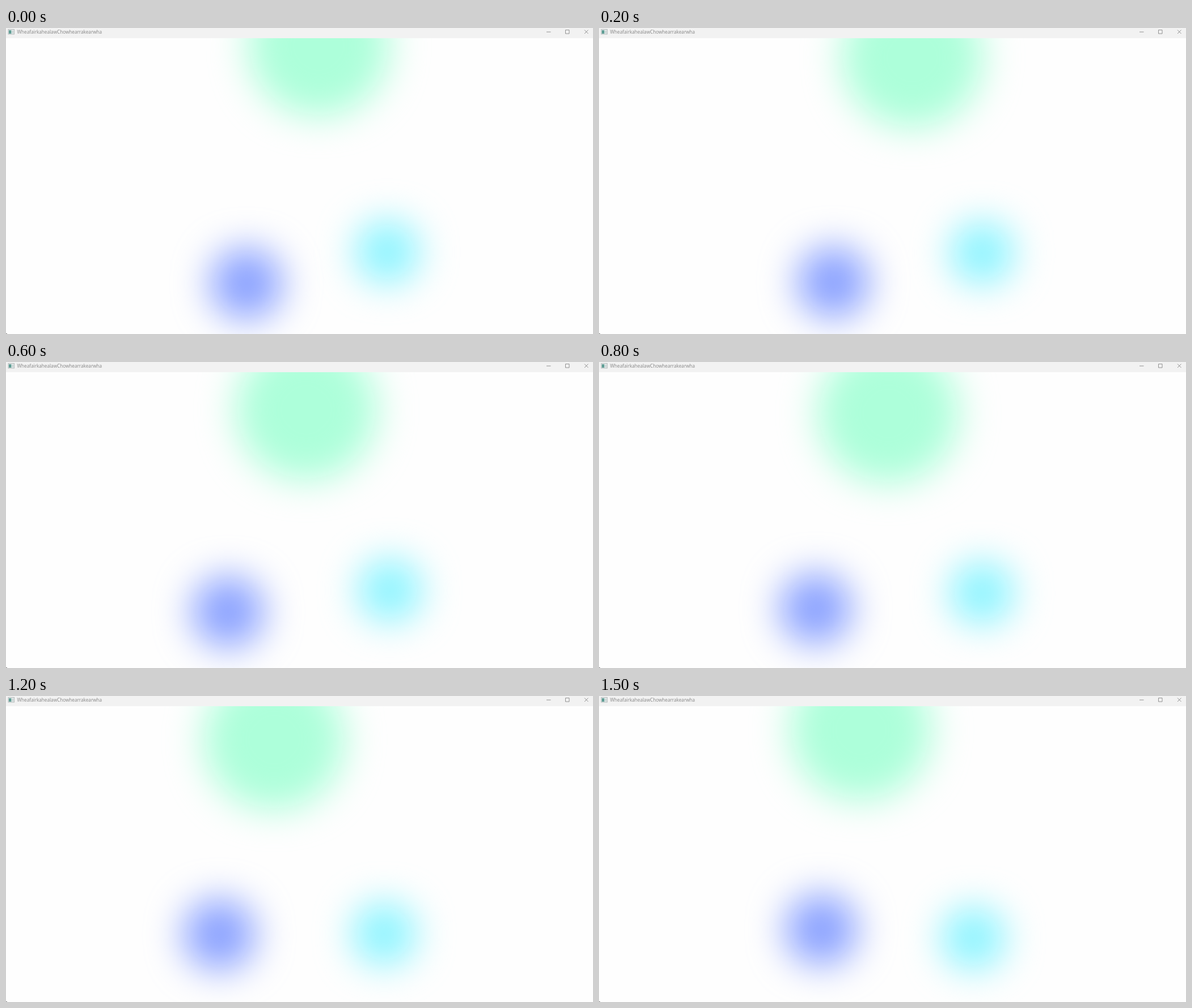
An HTML page that plays this animation: 1035x541 px, repeating every 1600 ms.

```html
<!DOCTYPE html>
<html lang="en">
<head>
<meta charset="utf-8">
<title>Drifting lights</title>
<style>
  html, body { margin: 0; width: 100%; height: 100%; overflow: hidden; background: #fefefe; }
  svg { display: block; width: 100vw; height: 100vh; }
  text { font: 8.2px "Open Sans", "Noto Sans", sans-serif; fill: #858585; }
</style>
</head>
<body>
<svg viewBox="0 0 1035 541">
  <defs>
    <filter id="soft" x="-100%" y="-100%" width="300%" height="300%" color-interpolation-filters="sRGB">
      <feGaussianBlur stdDeviation="32"/>
    </filter>
  </defs>
  <rect width="1035" height="541" fill="#fefefe"/>
  <g>
    <circle id="green" r="125" fill="#adffda" filter="url(#soft)"/>
    <circle id="blue" r="64" fill="#8ba2ff" filter="url(#soft)"/>
    <circle id="cyan" r="57" fill="#8df4ff" filter="url(#soft)"/>
  </g>

  <rect width="1035" height="18" fill="#f2f2f2"/>
  <g id="icon">
    <rect x="4" y="2.5" width="10.5" height="8.5" fill="#e8eeee" stroke="#a3aaaa" stroke-width=".8"/>
    <rect x="5" y="4" width="4.5" height="6" fill="#5f9d94"/>
    <rect x="11" y="4.5" width="2" height="5" fill="#c5cfcf"/>
  </g>
  <text x="19.5" y="10.3">WheafairkahealawChowhearrakearwha</text>
  <path d="M953 7h7.5M986.5 3.5h6.5v6.5h-6.5zM1020 3.5l6.5 6.5m0-6.5l-6.5 6.5" fill="none" stroke="#868686" stroke-width=".9"/>
  <rect y="540" width="2" height="1" fill="#777"/>
</svg>
<script>
  const LOOP = 1600, STEP = 200, LAST_STEP = 7, LAST_START = 1500;

  const bezier = (a, b, c, u) => a * (1 - u) ** 2 + 2 * b * u * (1 - u) + c * u * u;

  // Position of each light for u from 0 to 1 along its path.
  const paths = {
    green(u) {
      const angle = (-15 + 175 * u) * Math.PI / 180;
      return [506 + 47 * Math.cos(angle), 44 + 47 * Math.sin(angle)];
    },
    blue: u => [424 - 76 * u + 44 * u ** 6, bezier(452, 445.5, 413, u)],
    cyan: u => [bezier(672, 686, 660, u), bezier(396, 400, 428, u)]
  };

  // Poses are held; the second to last one stays longer.
  function stepAt(time) {
    return time >= LAST_START ? LAST_STEP : Math.min(Math.floor(time / STEP), LAST_STEP - 1);
  }

  function render(time) {
    const u = stepAt(time % LOOP) / LAST_STEP;
    for (const [id, path] of Object.entries(paths)) {
      const [x, y] = path(u);
      const light = document.getElementById(id);
      light.setAttribute("cx", x);
      light.setAttribute("cy", y);
    }
  }

  const origin = performance.now();
  function tick() {
    render(performance.now() - origin);
    requestAnimationFrame(tick);
  }
  tick();
</script>
</body>
</html>
```
